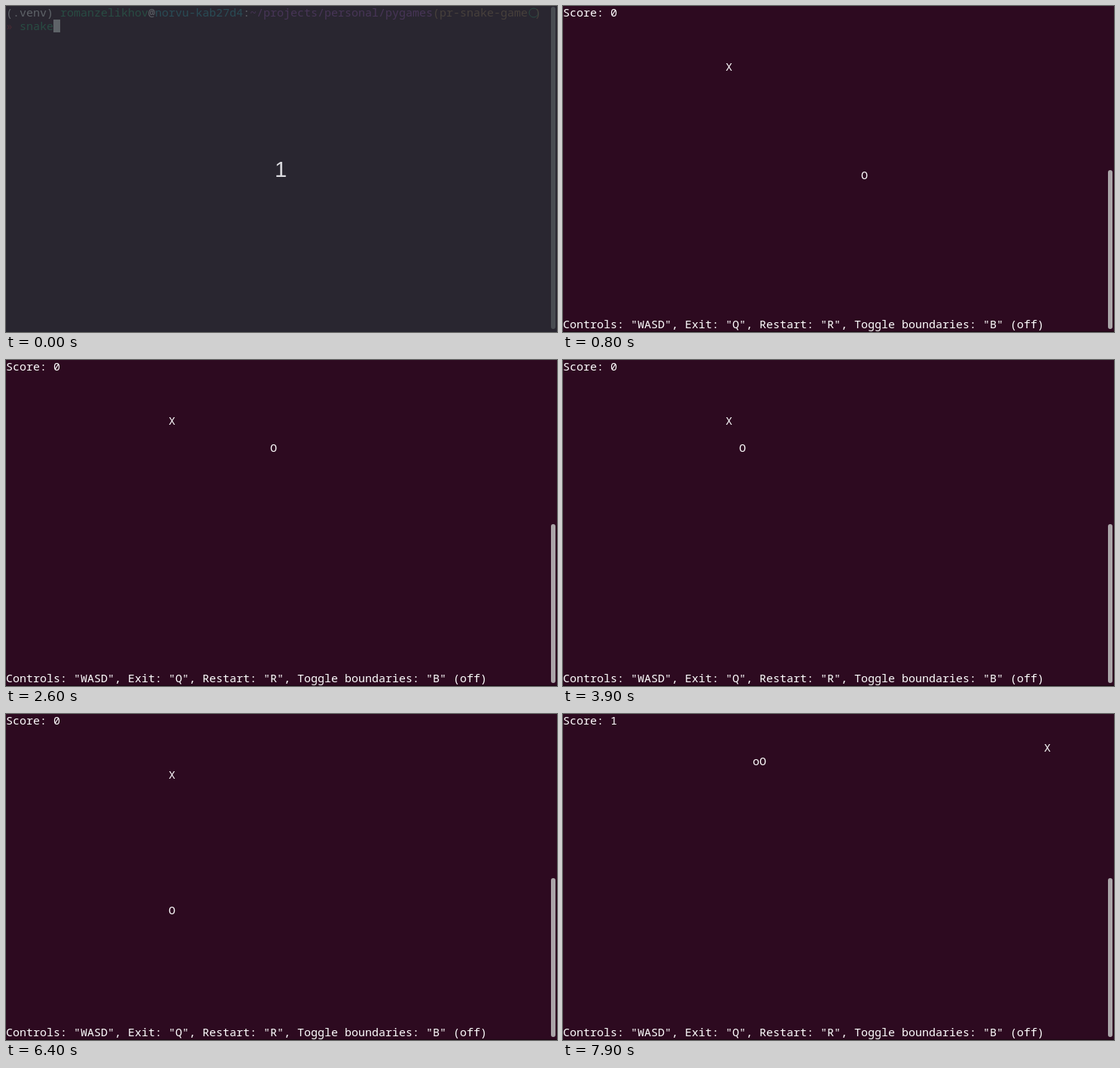
These frames come from a looping animation (732 by 433 pixels, 8000 ms). An HTML page with a canvas:

```html
<!DOCTYPE html>
<html lang="en">
<head>
<meta charset="utf-8">
<title>Terminal snake</title>
<style>
  html, body { margin: 0; width: 732px; height: 433px; overflow: hidden; background: #2d0a20; }
  canvas { display: block; }
</style>
</head>
<body>
<canvas id="stage" width="732" height="433"></canvas>
<script>
const ctx = document.getElementById('stage').getContext('2d');
const CELL_W = 9, CELL_H = 18, ROWS = 22, LOOP = 8000, TICK = 100;
const WHITE = '#fff', GREEN = '#26a269', BROWN = '#a2734c';

// Snake route: [dx, dy, steps]
const START = [40, 12];
const ROUTE = [
  [1, 0, 8], [0, -1, 6], [-1, 0, 25], [0, -1, 6], [1, 0, 5],
  [0, -1, 3], [-1, 0, 4], [0, -1, 16], [1, 0, 5]
];
const EAT_STEP = 72;

const PROMPT = [
  ['(.venv) ', WHITE],
  ['romanzelikhov', GREEN],
  ['@', WHITE],
  ['norvu-kab27d4', '#2aa1b3'],
  [':', WHITE],
  ['~/projects/personal/pygames', '#a347ba'],
  ['(pr-snake-game', BROWN]
];

function rect(x, y, w, h, color) {
  ctx.fillStyle = color;
  ctx.fillRect(x, y, w, h);
}

function print(text, col, row, color = WHITE) {
  ctx.fillStyle = color;
  ctx.fillText(text, col * CELL_W, row * CELL_H + 14);
}

function scrollbar(top) {
  ctx.fillStyle = '#aaa5a8';
  ctx.beginPath();
  ctx.roundRect(724, top, 6, 429 - top, 3);
  ctx.fill();
}

function drawPrompt(entered) {
  let col = 0;
  for (const [text, color] of PROMPT) {
    print(text, col, 0, color);
    col += text.length;
  }
  ctx.strokeStyle = GREEN;
  ctx.lineWidth = 1;
  ctx.beginPath();
  ctx.arc(701, 9, 6, 0, 2 * Math.PI);
  ctx.stroke();
  print(')', 78, 0, BROWN);
  print('»', 0, 1, '#a51d2d');
  print('snake', 2, 1, GREEN);
  rect(entered ? 0 : 63, entered ? 36 : 18, CELL_W, 17, WHITE);
  scrollbar(1);
}

function drawCountdown() {
  rect(0, 0, 732, 433, 'rgba(41,47,54,.75)');
  ctx.save();
  ctx.font = '29px "Liberation Sans", Arial, sans-serif';
  ctx.textAlign = 'center';
  ctx.fillStyle = '#dcdce0';
  ctx.fillText('1', 365, 227);
  ctx.restore();
}

function positionAt(step) {
  let [x, y] = START;
  for (const [dx, dy, count] of ROUTE) {
    const n = Math.min(step, count);
    x += dx * n;
    y += dy * n;
    step -= n;
  }
  return [x, (y - 1 + ROWS) % ROWS + 1];
}

function drawGame(step) {
  const eaten = step >= EAT_STEP;
  print('Score: ' + (eaten ? 1 : 0), 0, 0);
  print('Controls: "WASD", Exit: "Q", Restart: "R", Toggle boundaries: "B" (off)', 0, 23);
  if (eaten) print('X', 71, 2);
  else print('X', 24, 4);
  if (step > EAT_STEP) print('o', ...positionAt(step - 1));
  print('O', ...positionAt(step));
  scrollbar(218);
}

function draw(time) {
  const tick = Math.floor(time % LOOP / TICK);
  rect(0, 0, 732, 433, '#2d0a20');
  rect(0, 432, 732, 1, '#1a0612');
  ctx.font = '15px "Noto Sans Mono", "DejaVu Sans Mono", monospace';
  if (tick < 4) drawPrompt(tick === 3);
  // The game runs slightly faster than the screen ticks: 33 steps in 32 ticks
  else drawGame(tick - 4 + Math.floor((tick + 20) / 32));
  if (tick === 0) drawCountdown();
}

const begin = performance.now();
function loop() {
  draw(performance.now() - begin);
  requestAnimationFrame(loop);
}
loop();
</script>
</body>
</html>
```
